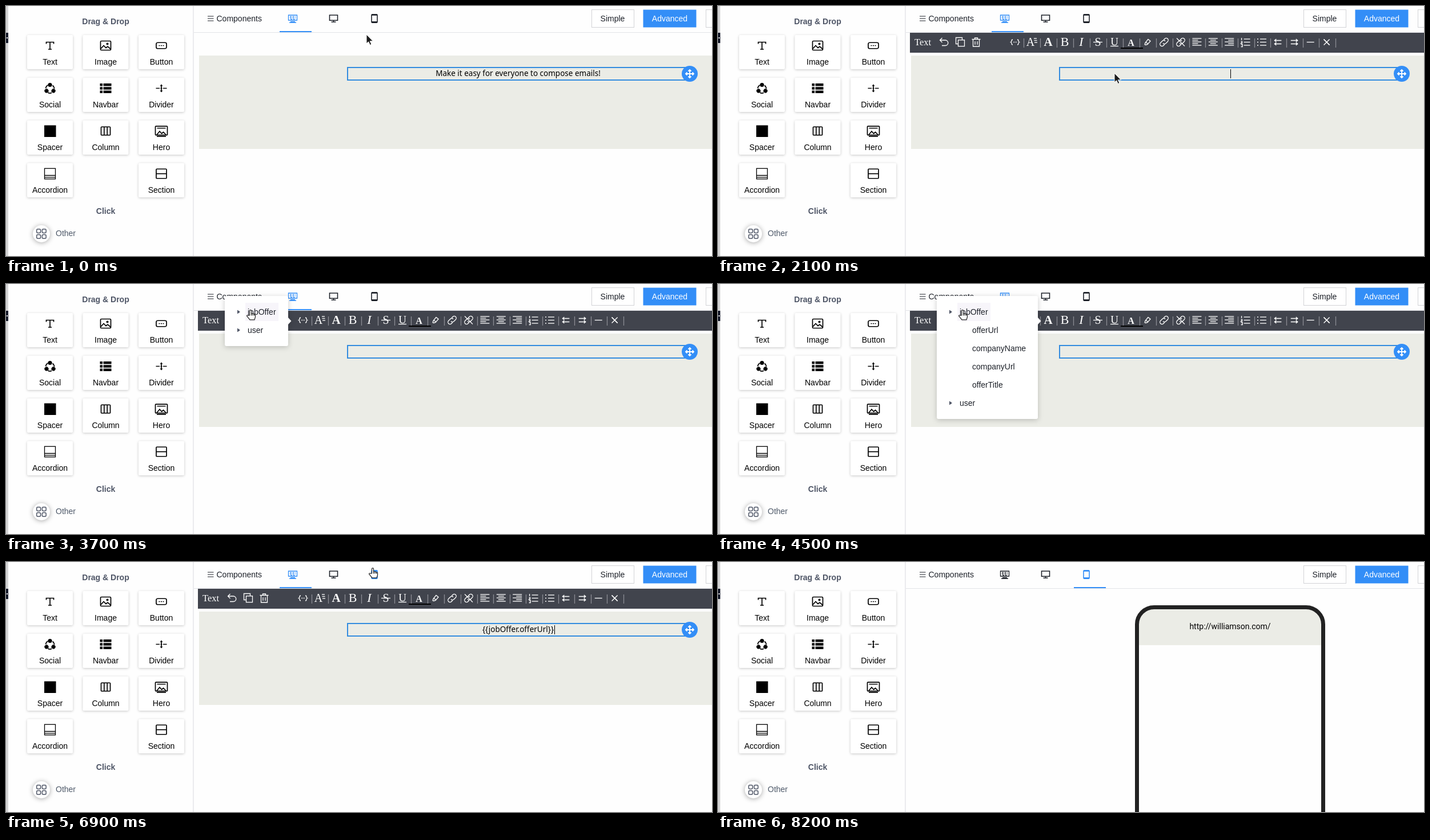
These frames come from a looping animation (1236x439 px, 9200 ms). An HTML page:

```html
<!DOCTYPE html>
<html lang="en">
<head>
<meta charset="utf-8">
<title>Email editor</title>
<style>
  html, body { margin: 0; width: 100%; height: 100%; overflow: hidden; background: #fefefe; }
  svg { display: block; width: 1236px; height: 439px; }
  text { font: 14px "Liberation Sans", Arial, sans-serif; fill: #1d2129; white-space: pre; }
  .mid { text-anchor: middle; }
  .light { fill: #fff; }
  .card { fill: #fff; filter: drop-shadow(0 1px 2px rgba(0, 0, 0, .22)); }
  .label { fill: #000; }
  .head { font-weight: bold; fill: #4e5566; }
  .other { fill: #4e5969; }
  .round { fill: #fff; filter: drop-shadow(0 1px 4px rgba(0, 0, 0, .35)); }
  .line { fill: none; stroke: #000; stroke-width: 1.7; }
  .tab { fill: none; stroke: #1d2129; stroke-width: 1.6; }
  .tab.on { stroke: #338ef7; }
  .tool { fill: none; stroke: #fff; stroke-width: 1.3; }
  .serif { font: 20px "Liberation Serif", Times, serif; fill: #fff; stroke: none; }
  .bold { font-weight: bold; }
  .italic { font-style: italic; }
  .mail { font: 13.5px "Noto Sans", "Open Sans", sans-serif; fill: #000; }
  .site { font: 14px Roboto, sans-serif; fill: #000; }
  .panel { fill: #fff; filter: drop-shadow(0 2px 5px rgba(0, 0, 0, .2)); }
</style>
</head>
<body>
<svg viewBox="0 0 1236 439">
  <rect width="1236" height="439" fill="#fefefe"/>

  <!-- side panel -->
  <rect width="4" height="439" fill="#d5d5d6"/>
  <path d="M0 47h4v18H0z" fill="#161b2b"/>
  <path d="M1 55h2v2H1z" fill="#fff"/>
  <path d="M328 0V439" stroke="#e2e3e7" stroke-width="1.4"/>
  <text class="mid head" x="174.5" y="32">Drag &amp; Drop</text>
  <g id="cards"></g>
  <text class="mid head" x="174.5" y="365">Click</text>
  <circle class="round" cx="62" cy="400" r="15"/>
  <g id="dots" fill="none" stroke="#4e5566" stroke-width="1.5"></g>
  <text class="other" x="87" y="404">Other</text>

  <!-- header -->
  <path d="M329 46.5H1236" stroke="#e2e3e7"/>
  <path d="M353 18h10.5m-10.5 4h10.5m-10.5 4h10.5" stroke="#1d2129" stroke-width="1.2"/>
  <text x="368.5" y="27">Components</text>
  <g class="tab" id="wide" transform="translate(502 22)">
    <path d="M-7.5-6h15v9h-15zM-4 5.500h8M-6 7H6" stroke-width="1.3"/>
    <path d="M-5-3.500H5M-5-1H5M-4 1.500H5" stroke-dasharray="3 1.500"/>
  </g>
  <g class="tab" transform="translate(573.5 22)">
    <path d="M-7-6H7V3.200H-7zM0 3v3M-4 6h8"/>
  </g>
  <g class="tab" id="tablet" transform="translate(645 22)">
    <rect x="-5" y="-7.2" width="10" height="14.4" rx="1.2"/>
    <path d="M-5-6.300H5M-5 6H5" stroke-width="2"/>
  </g>
  <rect id="mark" y="44" width="56" height="2" fill="#338ef7"/>
  <g fill="#fff" stroke="#d2d3d6">
    <rect x="1025.5" y="6.5" width="74" height="31"/>
    <rect x="1225.5" y="6.5" width="74" height="31"/>
  </g>
  <rect x="1115.5" y="6.5" width="93" height="31" fill="#338ef7"/>
  <text class="mid" x="1062" y="27">Simple</text>
  <text class="mid light" x="1162" y="27">Advanced</text>

  <!-- editor -->
  <g id="editor">
    <rect x="338" y="87" width="898" height="164" fill="#ebece6"/>
    <rect id="sel" y="110" height="17" fill="#a9cdf6"/>
    <rect x="598" y="108" width="599" height="22" fill="none" stroke="#338cdf" stroke-width="2"/>
    <circle cx="1197" cy="119" r="14" fill="#338ef7"/>
    <g id="move" transform="translate(1197 119)" fill="none" stroke="#fff" stroke-width="1.8"></g>
    <text class="mail mid" id="body" x="896.5" y="123"></text>
    <path id="caret" d="M.5 111V127" stroke="#000"/>
    <g id="bar">
      <rect x="336" y="47" width="900" height="35" fill="#41444d"/>
      <text class="serif" x="344" y="69" style="font-size:16.5px">Text</text>
      <rect id="press" x="506" y="51" width="28" height="27" rx="2" fill="#ecedf0"/>
      <g id="tools" class="tool"></g>
      <path d="M705 74H744" stroke="#000" stroke-width="2"/>
    </g>
  </g>

  <!-- phone preview -->
  <g id="phone">
    <g id="page">
      <path d="M737 146V110a27 27 0 0 1 27-27h265a27 27 0 0 1 27 27v36z" fill="#ebece6"/>
      <text class="site mid" x="896.5" y="118">http://williamson.com/</text>
    </g>
    <rect x="733.5" y="79.5" width="326" height="420" rx="30" fill="none" stroke="#222" stroke-width="7"/>
  </g>

  <g id="pop"></g>
  <g id="tip">
    <path d="M520 84l7 7h-14z" fill="#1d2129"/>
    <rect x="480" y="91" width="81" height="29" rx="2" fill="#1d2129"/>
    <text class="mid light" x="520.5" y="110">Variables</text>
  </g>

  <g id="cursor">
    <path id="arrow" d="M0 0V16L3.700 12.800 6.300 18.500 8.900 17.300 6.300 11.800H11.500z" fill="#1c1c1c" stroke="#fff"/>
    <path id="hand" d="M-1.500 9V1.200a1.500 1.500 0 0 1 3 0V6q3-.5 5 .8 1.700 0 2 1.500V12L7 16.800H-1L-6.500 10q.8-2 2.600-.8zM1.500 6v3.500M4 6v3.500M6.600 6.800v3" fill="#fff" stroke="#222" stroke-width="1.2"/>
  </g>
</svg>
<script>
const $ = id => document.getElementById(id);
const at = (x, y, s) => `<g transform="translate(${x} ${y})">${s}</g>`;
const line = d => `<path d="${d}"/>`;
const solid = d => `<path d="${d}" fill="#000" stroke="none"/>`;
const dot = (x, y, r) => `<circle cx="${x}" cy="${y}" r="${r}" fill="#000" stroke="none"/>`;
const box = (w, h, r = 0) => `<rect x="${-w / 2}" y="${-h / 2}" width="${w}" height="${h}" rx="${r}"/>`;
const turns = (n, f) => Array.from({ length: n }, (_, i) => f(i)).join('');
const spin = (n, s) => turns(n, i => `<g transform="rotate(${360 / n * i})">${s}</g>`);
const mirror = s => `<g transform="scale(-1 1)">${s}</g>`;

// component cards on a grid of three columns
const icons = {
  Text: line('M-6.500-3V-6h13v3M0-6V6.500M-3 6.500h6'),
  Image: box(18, 16, 1.5) + line('M-8.500 5.500l5-5.500 4 4 3-2.500 5 4.500') + dot(3, -3, 2),
  Button: box(18, 10.5, 2.5) + line('M-4.500 0h9').replace('/>', ' stroke-dasharray="2 1.500"/>'),
  Social: at(0, 1, spin(3, dot(0, -7, 3.6) + line('M4.500-6A7.500 7.500 0 0 1 7.500 0'))),
  Navbar: turns(3, i => solid(`M-10 ${6.2 * i - 8.5}h4.500v4.500h-4.500zm6 0h14v4.500h-14z`)),
  Divider: line('M-9.500 0H-3M3 0h6.500M-1.500 0h3') + spin(2, line('M0-6v6') + solid('M-2.500-4L0-7l2.500 3z')),
  Spacer: solid('M-10-10h20.500v20.500h-20.500z'),
  Column: box(16, 14.5, 1) + line('M-2.700-7v14M2.700-7v14'),
  Hero: at(0, -.7, box(21, 15.5, 1)) + line('M-7.500-5h15M-8 6.500l5-6 3.500 4 3-2.500 4.500 4.500M-8 9.300H8'),
  Accordion: `<g stroke-width="1.3">${box(19, 18.5) + line('M-9.500 3h19m-19 3.300h19')}</g>`,
  '': '',
  Section: box(18, 16.5, 1) + line('M-9 0H9')
};
$('cards').innerHTML = Object.entries(icons).map(([name, icon], i) => name && at(
  77 + 97.5 * (i % 3), 69.5 + 75 * Math.floor(i / 3),
  `<rect class="card" x="-40" y="-18.5" width="80" height="60" rx="2"/>
   <text class="mid label" y="33.5">${name}</text><g class="line">${icon}</g>`)).join('');
$('dots').innerHTML = at(61.9, 400, spin(4, at(4.8, 4.8, box(6.8, 6.8, 2))));
$('move').innerHTML = spin(4, line('M0 0v-7m-2.500 2.500l2.500-2.500 2.500 2.500'));

// toolbar: three buttons, then two runs with their own spacing
const glyph = (s, size, cls = '') => `<text class="serif mid ${cls}" y="6.5" style="font-size:${size}px">${s}</text>`;
const align = k => turns(5, i => {
  const w = i % 2 ? 10 : 16;
  return line(`M${-8 + (16 - w) * k} ${3 * i - 6.5}h${w}`);
});
const list = turns(3, i => line(`M-3 ${5.5 * i - 5.5}H8`));
const link = spin(2, line('M-2 2a3.800 3.800 0 0 0 5.200 0l3-3a3.500 3.500 0 0 0-5-5l-2 2'));
const brace = line('M-4-4.500q-2 0-2 2.200 0 1.800-1.500 2.300 1.500.5 1.500 2.300 0 2.200 2 2.200');
const indent = line('M-6-3H6M-6 3H6M-3-5.500L-6-3l3 2.500m0 1L-6 3l3 2.500');
const cross = spin(2, line('M-5-5L5 5')) + line('M-5 5L5-5');
const tools = [
  line('M-7-3.500h9a4.500 4.500 0 0 1 0 9.500h-6M-3.500-7.500l-4 4 4 4'),
  line('M-3.500 3h-4V-8h11v4') + at(2, 1.7, box(11, 11)),
  line('M-7.500-5h15M-2.500-5v-2.500h5V-5M-5.500-5V7.500h11V-5M-2-1.500v6m4-6v6'),
  `<g id="vars">${brace + mirror(brace) + turns(3, i => line(`M${2.4 * i - 3} 0h1.200`))}</g>`,
  at(-2, 0, glyph('A', 20) + turns(3, i => line(`M${6 + i / 2} ${3.5 * i - 6.5}h5`))),
  glyph('A', 21, 'bold'),
  glyph('B', 22),
  glyph('I', 22, 'italic'),
  glyph('S', 20) + line('M-8 0H8'),
  at(0, -1, glyph('U', 19)) + line('M-7 7H7'),
  glyph('A', 16, 'bold'),
  line('M-5 5l1-4 5-6 4 3-5 6-4 1M-3 0l3.500 3'),
  link,
  link + line('M-7-7L7 7'),
  align(0), align(.5), align(1),
  list + line('M-7-7.500v4M-8-1h2v1.500l-2 1.500h2.500M-8 4h2.500v4H-8'),
  list + turns(3, i => line(`M-8 ${5.5 * i - 5.5}h2`)),
  indent, mirror(indent),
  line('M-6.500 0h13'),
  cross
];
const toolX = i => i < 3 ? 396 + 28 * i : i < 14 ? 520 + 29 * (i - 3) : 810 + 28.4 * (i - 13);
$('tools').innerHTML = tools.map((s, i) => at(toolX(i), 63.5, s)
  + (i < 3 ? '' : `<path d="M${Math.round(toolX(i) + 15) + .5} 57v16" stroke="#8b8d94"/>`)).join('');

// variables popup: rows 32px apart, tail pointing at its button
function popup(names, w, tail) {
  const row = (s, i) => {
    const root = s === 'jobOffer' || s === 'user', y = 28 + 32 * i;
    return (root ? `<path d="M22 ${y - 3.5}l5 3.500-5 3.500z" fill="#4e5566"/>` : '')
      + `<text x="${root ? 40 : 62}" y="${y + 5}">${s}</text>`;
  };
  return `<g class="panel"><rect width="${w}" height="${56 + 32 * (names.length - 1)}" rx="3"/>
    <path d="M${w} ${tail - 6}l5.500 6-5.500 6z"/></g>
    <rect id="hover" x="36" y="12" width="58" height="32" fill="#f7f5fa"/>` + names.map(row).join('');
}
const shut = ['jobOffer', 'user'];
const full = ['jobOffer', 'offerUrl', 'companyName', 'companyUrl', 'offerTitle', 'user'];

// pointer legs: start, end, target x, target y
const legs = [
  [0, 400, 843, 103], [600, 700, 856, 106], [900, 1200, 1020, 112], [1500, 1600, 807, 112],
  [1700, 2100, 694, 118], [2200, 2700, 528, 62], [3200, 3700, 428, 46], [4800, 5000, 416, 14],
  [6300, 6900, 642, 11], [7200, 7700, 470, -30]
];
const ramp = (t, a, b) => Math.min(1, Math.max(0, (t - a) / (b - a)));
const smooth = p => p * p * (3 - 2 * p);
const within = (t, a, b) => t >= a && t < b;
const show = (id, on) => { $(id).style.display = on ? '' : 'none'; };
const set = (id, name, value) => $(id).setAttribute(name, value);
const pointer = t => legs.reduce(([x, y], [a, b, u, v]) => {
  const p = smooth(ramp(t, a, b));
  return [x + (u - x) * p, y + (v - y) * p];
}, [631, 50]);

function draw(t) {
  const [x, y] = pointer(t);
  const hand = within(t, 3500, 5700) || within(t, 6800, 7300);
  set('cursor', 'transform', `translate(${x} ${y})`);
  show('arrow', !hand);
  show('hand', hand);

  const preview = t >= 7000;
  show('editor', !preview);
  show('phone', preview);
  show('page', t >= 8200);
  $('wide').classList.toggle('on', !preview);
  $('tablet').classList.toggle('on', t >= 6800);
  set('mark', 'x', preview ? 623 : 479);

  const pressed = within(t, 2700, 3400);
  show('bar', t >= 1000);
  show('press', pressed);
  set('vars', 'stroke', pressed ? '#41444d' : '#fff');

  const typed = t >= 5600, left = Math.max(752, x);
  $('body').textContent = t < 1900 ? 'Make it easy for everyone to compose emails!'
    : typed ? '{{jobOffer.offerUrl}}' : '';
  show('sel', within(t, 1600, 1900));
  set('sel', 'x', left);
  set('sel', 'width', Math.max(0, 1035 - left));
  set('caret', 'transform', `translate(${typed ? 960 : 897} 0)`);
  show('caret', within(t, 1900, 2400) || within(t, 5600, 6200) || t >= 6700);

  $('tip').style.opacity = ramp(t, 2600, 2800) * (1 - ramp(t, 3400, 3700));
  const grown = 1 - (1 - ramp(t, 2700, 3100)) ** 3;
  const open = t >= 4400, moved = t >= 4600;
  const w = open ? 177 : 111, tail = moved ? 108 : 44;
  $('pop').innerHTML = popup(open ? full : shut, w, tail);
  $('pop').style.opacity = grown * (1 - ramp(t, 5600, 5800));
  set('pop', 'transform',
    `translate(494 65) scale(${.7 + .3 * grown}) translate(${moved ? -177 : -111} ${-tail})`);
  show('hover', within(t, 3700, 4600));
}

const start = performance.now();
let shown;
function tick() {
  const t = Math.floor((performance.now() - start) % 9200 / 100) * 100;
  if (t !== shown) draw(shown = t);
  requestAnimationFrame(tick);
}
tick();
</script>
</body>
</html>
```
